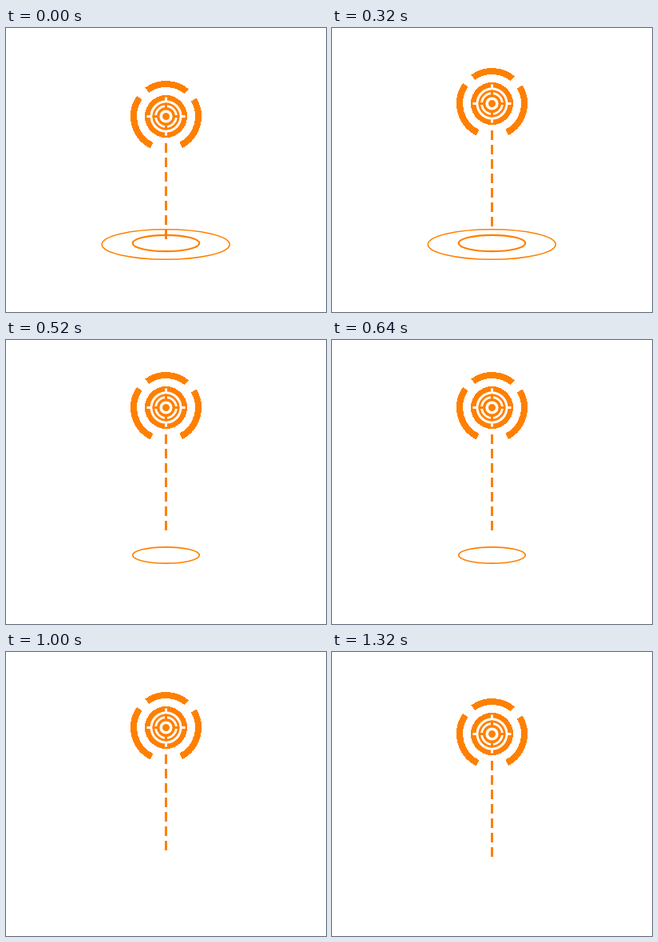
An HTML page that plays this animation: 401x355 px, repeating every 1400 ms.

```html
<!DOCTYPE html>
<html lang="en">
<head>
<meta charset="utf-8">
<title>Target beacon</title>
<style>
  html, body { margin: 0; width: 100%; height: 100%; overflow: hidden; background: #fff; }
  svg { display: block; width: 401px; height: 355px; }
  .line { fill: none; stroke: #ff8000; }
  .gap { fill: none; stroke: #fff; }
  .crisp { shape-rendering: crispEdges; }
</style>
</head>
<body>
<svg viewBox="0 0 401 355">
  <ellipse id="outer" class="line" cx="200.2" cy="270.5" rx="80" ry="18.8" stroke-width="1.6"/>
  <ellipse id="inner" class="line" cx="200.5" cy="269" rx="41.8" ry="10.2"/>
  <g id="beacon">
    <path class="line" d="M0 33.5V153.5" stroke-width="3" stroke-dasharray="12 6"/>
    <g id="arcs" class="line crisp" stroke-width="8"></g>
    <circle class="crisp" r="26.5" fill="#ff8000"/>
    <circle class="gap" r="18.5" stroke-width="3"/>
    <circle class="gap" r="12.9" stroke-width="2.8"/>
    <path class="line" d="M0-17V-8M0 17V8M-17 0H-8M17 0H8" stroke-width="3"/>
    <circle class="gap" r="6.3" stroke-width="3.6"/>
    <path class="gap" d="M0-24V-19M0 24V19M-24 0H-19M24 0H19" stroke-width="3"/>
  </g>
</svg>
<script>
  const LOOP = 1400, STEP = 40;
  const PEAK = 560, REST = 1320;
  const OUTER_OFF = 360, INNER_OFF = 720;
  const $ = id => document.getElementById(id);
  const outer = $('outer'), inner = $('inner'), beacon = $('beacon');

  function arc(from, to, r = 40.5) {
    const point = deg => {
      const a = deg * Math.PI / 180;
      return `${r * Math.cos(a)} ${-r * Math.sin(a)}`;
    };
    const path = document.createElementNS('http://www.w3.org/2000/svg', 'path');
    path.setAttribute('d', `M${point(from)}A${r} ${r} 0 0 0 ${point(to)}`);
    $('arcs').append(path);
  }
  arc(50.5, 126);
  arc(145, 243.5);
  arc(-62.5, 31);

  // Rises quickly, sinks slowly, then snaps back at the loop point.
  function height(t) {
    if (t <= PEAK) return 110 - 28 * t / PEAK;
    return 82 + 20 * Math.min(1, (t - PEAK) / (REST - PEAK));
  }

  function draw(now) {
    const t = Math.floor(now % LOOP / STEP) * STEP;
    beacon.setAttribute('transform', `translate(200.5 ${Math.round(height(t)) + 0.5})`);
    outer.style.visibility = t < OUTER_OFF ? 'visible' : 'hidden';
    inner.style.visibility = t < INNER_OFF ? 'visible' : 'hidden';
    inner.style.strokeWidth = t < OUTER_OFF ? 2.2 : 1.7;
  }

  const start = performance.now();
  function tick() {
    draw(performance.now() - start);
    requestAnimationFrame(tick);
  }
  tick();
</script>
</body>
</html>
```
